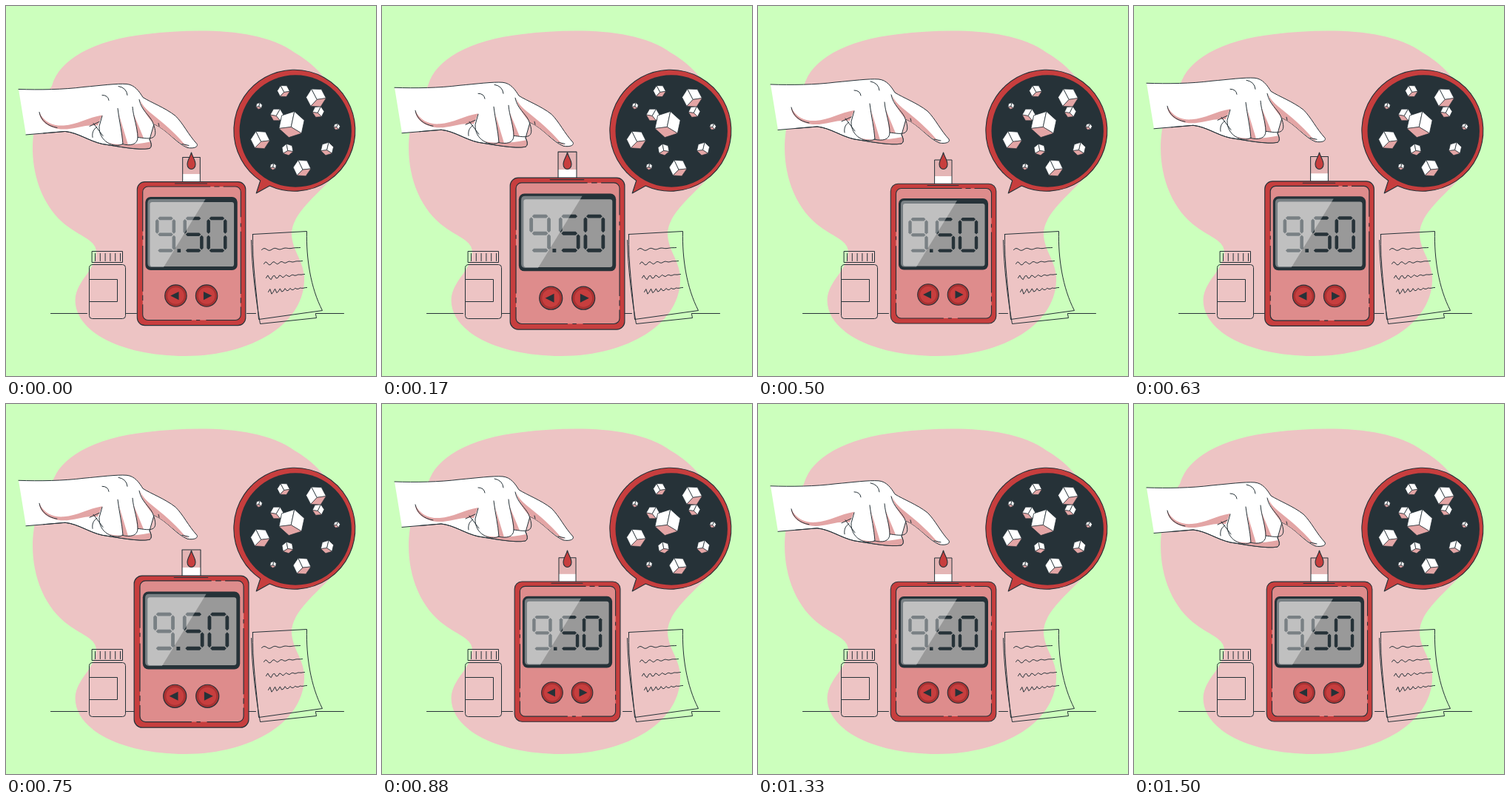
An HTML page for the animation above (1540 ms loop, 500 px wide and 500 px high).

```html
<!DOCTYPE html>
<html lang="en">
<head>
<meta charset="utf-8">
<title>Blood sugar check</title>
<style>
  html, body { margin: 0; width: 100%; height: 100%; overflow: hidden; background: #ccffbd; }
  svg { display: block; width: 100%; height: 100%; }
  .ln { fill: none; stroke: #263238; stroke-linecap: round; stroke-linejoin: round; }
  .red { fill: #c73e3e; }
  .dark { fill: #263238; }
  .shade { fill: #e3a5a5; }
  .edge { stroke: #263238; stroke-width: 1.1; stroke-linejoin: round; }
</style>
</head>
<body>
<svg viewBox="0 0 500 500">
  <path fill="#edc4c4" d="M62 108C72 72 118 46 190 38C260 30 345 30 390 63C455 100 480 180 441 232C420 256 386 280 386 309C387 330 401 343 403 365C406 430 330 473 243 473C150 473 88 436 94 392C99 368 121 356 122 333C122 317 104 313 85 299C30 260 20 165 62 108Z"/>

  <g class="ln" transform="translate(.5 .5)">
    <path d="M60 415H109M162 415H176M325 415H337M418 415H456"/>
    <rect x="116" y="331" width="41" height="15"/>
    <rect x="112" y="349" width="49" height="73" rx="4"/>
    <path d="M113 369H150V399H113"/>
    <path id="ribs"/>
    <path d="M333 308L406 304C405 340 411 380 427 411L341 423C338 385 332 345 333 308Z"/>
    <path d="M331 316C332 355 337 395 343 429L419 421L418 416"/>
    <path id="notes"/>
  </g>

  <g transform="translate(391.200 169)">
    <path class="red edge" d="M-47.500 67L-53 84L-35 74A82 82 0 1 0 -47.500 67Z"/>
    <circle class="dark" r="75.700"/>
  </g>
  <g id="cubes" stroke="#263238" stroke-width=".8" stroke-linejoin="round"></g>

  <g id="meter">
    <rect x="239" y="208" width="23" height="35" fill="#e4b5b5"/>
    <rect x="239" y="230" width="23" height="13" fill="#fff"/>
    <rect class="ln" x="239" y="208" width="23" height="35"/>
    <rect class="red edge" x="179.300" y="240.200" width="142.500" height="188.800" rx="10"/>
    <path class="ln" d="M229 242.500H271"/>
    <rect class="edge" x="186.500" y="246.500" width="129" height="175.500" rx="7" fill="#de8c8c" stroke-dasharray="82 5 7 5 60 8 5 6"/>
    <rect class="dark" x="190" y="260" width="121" height="96.500" rx="7"/>
    <rect x="196" y="267" width="110.500" height="84.500" rx="3" fill="#999"/>
    <g id="digits" class="dark"></g>
    <path fill="#fff" opacity=".38" d="M198 263H269L214 352.500H198Q193 352.500 193 347.500V268Q193 263 198 263Z"/>
    <g id="buttons"></g>
  </g>

  <path class="red edge" d="M250.500 198C252 204 256 208 256 214A5.500 6.500 0 0 1 245 214C245 208 249 204 250.500 198Z"/>

  <g id="hand">
    <path class="ln" fill="#fff" style="fill:#fff" stroke-dasharray="528 70" d="M17 113C45 114 78 113.500 105 110C128 108 150 105 163 106C174 107 180 116 185 124C196 131 215 138 229 149C240 160 246 174 258 187C260 191 254 193.500 245 192C230 186 218 168 200 160L194 181C197 187 197 191 194 193C180 196 150 190 130 187C112 183 98 172 80 170L27 174.500"/>
    <path class="shade" d="M45 144C52 159 66 163 78 162C96 161 111 151 130 148L124 162C105 160 92 168 74 167C56 165 45 155 45 144Z"/>
    <path class="shade" d="M134 184C150 190 175 188 195 184C198 190 195 194 188 194C168 193 150 191 134 184Z"/>
    <path class="shade" d="M181 127C188 145 210 151 241 187L248 192C230 186 218 168 200 160C193 153 184 140 181 127Z"/>
    <path class="shade" d="M172 145C176 158 176 170 178 178L186 179ZM152 145C156 160 156 175 158 187L165 188Z"/>
    <g class="ln">
      <path d="M27 174.500L80 170C98 172 112 183 130 187C150 190 180 196 194 193C197 191 197 187 194 181"/>
      <path d="M45 144C47 155 56 163 69 165"/>
      <path d="M180 127C183 142 194 148 198 157C209 184 194 180 178 178"/>
      <path d="M171 137C172 151 178 165 178 178C178 188 168 190 157 187"/>
      <path d="M151 139C153 156 157 172 158 187C146 193 125 184 126 163L130 149"/>
      <path d="M113 163L126 157M118 159L131 176M117 178C116 172 118 167 123 164"/>
      <path d="M130 121Q138 121 139 128M152 109Q163 111 164 121M206 159L207 163M238 187L247 189"/>
    </g>
  </g>
</svg>
<script>
const el = id => document.getElementById(id);
const range = n => [...Array(n).keys()];
const LOOP = 1540, LEAD = 40;

// a white box seen from above its shaded face; the turn follows from its place
function cube(x, y, r) {
  const turn = 30 * Math.sin(x);
  const at = (deg, d = r) => {
    const a = (deg + turn) * Math.PI / 180;
    return `${x + d * Math.cos(a)},${y + d * Math.sin(a)}`;
  };
  const face = (from, look) =>
    `<polygon ${look} points="${at(90, r * .2)} ${at(from)} ${at(from + 60)} ${at(from + 120)}"/>`;
  return face(150, 'fill="#fff"') + face(270, 'fill="#fff"') + face(30, 'class="shade" stroke-width=".6"');
}

const spots = '366,147,9 375,115,8.5 422,143,8 419,124,13.5 386,160,18 343.5,181,13 ' +
  '380.5,194,8 434,193,9 400,219,12 342,135,4.5 447,163,4.5 361,217,4.5';
el('cubes').innerHTML = spots.split(' ').map(s => cube(...s.split(',').map(Number))).join('');

function bar(x, y, len, upright) {
  const pts = [[1, 0], [3.2, -2.2], [len - 3.2, -2.2], [len - 1, 0], [len - 3.2, 2.2], [3.2, 2.2]];
  const out = pts.map(([u, v]) => upright ? `${x + v},${y + u}` : `${x + u},${y + v}`);
  return `<polygon points="${out.join(' ')}"/>`;
}

function digit(x, lit) {
  const w = 22, h = 21.2, y = 288.2;
  const bars = {
    a: [x, y, w], g: [x, y + h, w], d: [x, y + 2 * h, w],
    f: [x, y, h, true], b: [x + w, y, h, true],
    e: [x, y + h, h, true], c: [x + w, y + h, h, true]
  };
  return [...lit].map(k => bar(...bars[k])).join('');
}
el('digits').innerHTML = digit(205.5, 'abcdfg') + digit(242, 'acdfg') + digit(273, 'abcdef') +
  '<rect x="232" y="328.500" width="4.500" height="4.500"/>';

const button = (x, dir) => `<g transform="translate(${x} 390) scale(${dir} 1)">
  <circle class="edge" r="14.300" fill="#a93232"/><circle class="red" r="11"/>
  <path class="dark" d="M-7 0L4 -5.500V5.500Z"/></g>`;
el('buttons').innerHTML = button(230, 1) + button(270.5, -1);

el('ribs').setAttribute('d', range(6).map(i => `M${120 + 6.8 * i} 334V344`).join(''));

// handwriting: a wobble that fades out towards the end of the line
function scrawl(row) {
  const x = 345 + 3 * row, y = 329 + 19 * row;
  return 'M' + range(24).map(i => {
    const u = i / 23, fade = (1 - u) ** 1.2;
    return `${x + 52 * u} ${y - (3 + row) * u - (2 + row * .8) * fade * Math.sin(i * (1 + row * .35))}`;
  }).join('L');
}
el('notes').setAttribute('d', range(4).map(scrawl).join(''));

const pulse = (p, peak, rise, fall) =>
  Math.max(0, 1 - (p < peak ? (peak - p) / rise : (p - peak) / fall));

function draw(t) {
  const p = ((t + LEAD) % LOOP) / LOOP;
  const lift = 10 * (1 - Math.abs(1 - 2 * p));
  const size = 1 + .105 * pulse(p, .1, .1, .2) + .1 * pulse(p, .5, .1, .1);
  el('meter').setAttribute('transform', `translate(250.500 334.600) scale(${size}) translate(-250.500 -334.600)`);
  el('hand').setAttribute('transform', `translate(0 ${-lift})`);
}

const start = performance.now();
function tick() {
  draw(performance.now() - start);
  requestAnimationFrame(tick);
}
tick();
</script>
</body>
</html>
```
